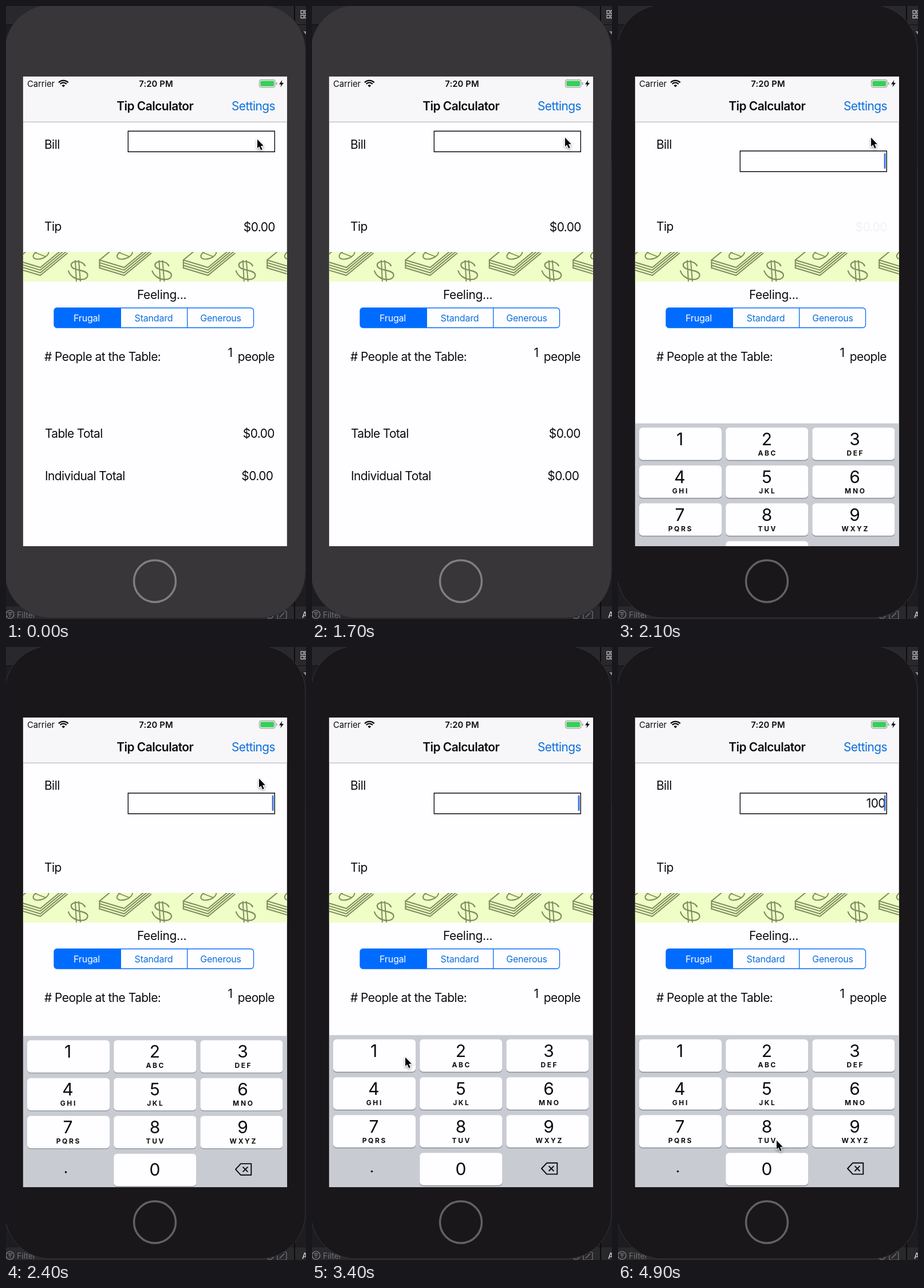
An HTML page with a canvas for the animation above (5000 ms loop, 524 px wide and 1069 px high).

```html
<!DOCTYPE html>
<html lang="en">
<head>
<meta charset="utf-8">
<title>Tip Calculator</title>
<style>
  html, body { margin: 0; width: 100%; height: 100%; overflow: hidden; background: #1d1c1f; }
  canvas { display: block; }
</style>
</head>
<body>
<canvas id="stage" width="524" height="1069"></canvas>
<script>
const ctx = document.getElementById('stage').getContext('2d');
const LOOP = 5000, STEP = 100;
const FOCUS = 1800, SLIDE = 1850;
const INK = '#0b0b0c', LINK = '#0a6fdf', BLUE = '#006cff', OLIVE = '#7f8c5e';
const SCREEN = { x: 29.7, y: 123, w: 461.2, h: 819 };

// Pointer stops: time, x, y
const PATH = [
  [0, 438, 231], [500, 438, 231], [1300, 441, 228], [2600, 441, 228],
  [3300, 162, 714], [3700, 162, 714], [4200, 237, 920], [4600, 237, 920], [4900, 276, 859]
];
// Typed value from each moment on
const TYPED = [[FOCUS, ''], [3600, '1'], [4400, '10'], [4700, '100']];

const clamp = v => Math.min(1, Math.max(0, v));
const inOut = p => p < 0.5 ? 2 * p * p : 1 - 2 * (1 - p) ** 2;
const spring = s => s <= 0 ? 0 : 1 - (1 + 14.5 * s) * Math.exp(-14.5 * s);

function text(str, x, y, o = {}) {
  ctx.font = `${o.weight || 400} ${o.size || 20.9}px Inter, sans-serif`;
  ctx.letterSpacing = (o.gap ?? -0.55) + 'px';
  ctx.textAlign = o.align || 'left';
  ctx.fillStyle = o.color || INK;
  ctx.fillText(str, x, y);
}

function rect(x, y, w, h, color) {
  ctx.fillStyle = color;
  ctx.fillRect(x, y, w, h);
}

function round(x, y, w, h, r) {
  ctx.beginPath();
  ctx.roundRect(x, y, w, h, r);
}

function fill(color) { ctx.fillStyle = color; ctx.fill(); }

function stroke(color, width) {
  ctx.strokeStyle = color;
  ctx.lineWidth = width;
  ctx.stroke();
}

function poly(points, close) {
  ctx.beginPath();
  points.forEach(([x, y]) => ctx.lineTo(x, y));
  if (close) ctx.closePath();
}

function line(x1, y1, x2, y2, color, width) {
  poly([[x1, y1], [x2, y2]]);
  stroke(color, width);
}

function circle(x, y, r) {
  ctx.beginPath();
  ctx.arc(x, y, r, 0, Math.PI * 2);
}

function drawDesk() {
  rect(0, 0, 524, 1069, '#1d1c1f');
  rect(0, 0, 524, 32, '#29282b');
  line(0, 32.5, 524, 32.5, '#111013', 1);
  rect(504, 33, 20, 10, '#29282b');
  rect(521, 198, 3, 74, '#08080a');
  for (const [x, y] of [[515, 8], [522, 8], [515, 16], [522, 16]]) {
    ctx.beginPath();
    ctx.rect(x, y, 5, 5);
    stroke('#b4b3b5', 1.3);
  }
  poly([[519, 44], [524, 44], [524, 50]], true);
  fill('#8b8a8d');

  rect(0, 1047, 524, 22, '#29282b');
  circle(7, 1061, 7);
  stroke('#8b8a8d', 1.2);
  [3.5, 2.5, 1.2].forEach((half, i) =>
    line(7 - half, 1058 + i * 3, 7 + half, 1058 + i * 3, '#8b8a8d', 1.2));
  text('Filter', 19, 1067, { size: 14, gap: 0, color: '#737276' });
  circle(461, 1062, 6);
  stroke('#77767a', 1.2);
  round(474, 1055, 16, 14, 2);
  stroke('#77767a', 1.2);
  line(478, 1066, 486, 1058, '#77767a', 1.2);
  rect(503, 0, 2, 1069, '#0c0b0e');
  text('A', 517, 1067, { size: 14, weight: 500, gap: 0, color: '#d0cfd1' });
}

function drawPhone(active) {
  round(-2, -2, 525, 1069, 80);
  fill(active ? '#19171a' : '#383638');
  stroke(active ? '#363538' : '#2c2a2d', 1);
  circle(260, 1003, 36.5);
  stroke(active ? '#626164' : '#7f7e80', 3.5);
}

function drawStatus() {
  text('Carrier', 37, 141, { size: 14.8, gap: -0.05 });
  text('7:20 PM', 262, 141, { size: 14.8, weight: 600, gap: 0.1, align: 'center' });

  for (const r of [4, 7.8, 11.6]) {
    ctx.beginPath();
    if (r === 4) ctx.moveTo(100.3, 141.5);
    ctx.arc(100.3, 141.5, r, -Math.PI * 0.755, -Math.PI * 0.245);
    if (r === 4) fill(INK); else stroke(INK, 2.3);
  }

  round(442.5, 128.6, 27.5, 13.2, 3.5);
  stroke('#a09fa2', 1.2);
  round(444.3, 130.4, 24, 9.6, 2);
  fill('#36cf58');
  round(471.7, 133, 1.8, 4.4, 1);
  fill('#a09fa2');
  poly([[482.5, 129], [477, 136.4], [480.6, 136.4], [479.3, 141.6], [485, 134], [481.4, 134]], true);
  fill(INK);
}

function drawNav() {
  rect(SCREEN.x, 123, SCREEN.w, 79, '#f7f6f8');
  rect(SCREEN.x, 201.6, SCREEN.w, 1.2, '#b9b8bb');
  drawStatus();
  text('Tip Calculator', 260.3, 182, { weight: 600, gap: -0.5, align: 'center' });
  text('Settings', 470, 182, { color: LINK, align: 'right' });
}

function drawStack() {
  for (let d = 0; d < 15; d += 4.6) {
    poly([[17, 443 + d], [60, 456 + d], [107, 417.5 + d]]);
    stroke(OLIVE, 2);
  }
  line(17, 443, 17, 457, OLIVE, 2);
  line(17, 443, 37, 426.5, OLIVE, 2);
  ctx.beginPath();
  ctx.ellipse(61, 433, 14, 7.5, -0.35, 0, Math.PI * 2);
  stroke(OLIVE, 2);
  line(51, 430, 69, 437, OLIVE, 1.8);
}

function drawDollar() {
  ctx.beginPath();
  ctx.moveTo(138, 453);
  ctx.bezierCurveTo(134, 443, 112, 443, 114, 453);
  ctx.bezierCurveTo(116, 462, 138, 459, 142, 467);
  ctx.bezierCurveTo(147, 480, 116, 482, 109, 462);
  stroke(OLIVE, 2.2);
  line(121, 444, 123, 481, OLIVE, 2);
  line(127, 444, 130, 481, OLIVE, 2);
}

function drawBand() {
  ctx.save();
  ctx.beginPath();
  ctx.rect(SCREEN.x, 429, SCREEN.w, 51.5);
  ctx.clip();
  rect(29, 429, 463, 52, '#effdc6');
  ctx.lineJoin = ctx.lineCap = 'round';
  for (let i = 0; i < 4; i++) {
    ctx.save();
    ctx.translate(i * 146.4, 0);
    drawStack();
    drawDollar();
    ctx.restore();
  }
  ctx.restore();
}

function drawSegments() {
  round(84, 526.5, 116.5, 34.5, [5, 0, 0, 5]);
  fill(BLUE);
  round(84, 526.5, 348.5, 34.5, 5);
  stroke(BLUE, 1.3);
  line(200.3, 526, 200.3, 561, BLUE, 1.3);
  line(316.7, 526, 316.7, 561, BLUE, 1.3);
  ['Frugal', 'Standard', 'Generous'].forEach((name, i) =>
    text(name, 141 + i * 117, 549.5,
      { size: 16, gap: -0.2, align: 'center', color: i ? LINK : '#fff' }));
}

function drawField(t, moved) {
  const y = 218.2 + 36.6 * moved;
  ctx.beginPath();
  ctx.rect(213.3, y, 256, 36);
  stroke(INK, 1.4);
  if (t < FOCUS) return;
  const [since, value] = TYPED.filter(([at]) => at <= t).pop();
  text(value, 467, y + 24.7, { align: 'right' });
  const age = t - since - (value ? 0 : 100);
  if (age >= 0 && age % 1000 <= 600) {
    round(464.6, y + 4, 2.9, 27, 1);
    fill('#3f77d8');
  }
}

function drawForm(t) {
  const moved = inOut(clamp((t - SLIDE) / 300));
  text('Bill', 67, 249);
  text('Tip', 67, 392);
  drawField(t, moved);
  drawBand();
  text('Feeling...', 272, 511, { align: 'center', gap: -0.3 });
  drawSegments();
  text('# People at the Table:', 67, 619, { gap: -0.5 });
  text('1', 395.5, 612, { align: 'right' });
  text('people', 469, 619, { align: 'right' });

  ctx.globalAlpha = 1 - moved;
  text('$0.00', 470, 392.5, { align: 'right' });
  text('Table Total', 68, 753, { gap: -0.65 });
  text('$0.00', 469, 753, { align: 'right' });
  text('Individual Total', 68, 827);
  text('$0.00', 466.5, 827, { align: 'right' });
  ctx.globalAlpha = 1;
}

function drawKey(i, letters) {
  const col = i % 3, row = Math.floor(i / 3);
  const x = 37 + col * 151.2, y = 7.5 + row * 66;
  const mid = [108, 260, 413.5][col];
  round(x, y + 1.4, 144, 56.5, 6);
  fill('#8b8d91');
  round(x, y, 144, 56.5, 6);
  fill('#fefdff');
  const digit = row === 3 ? '0' : String(i + 1);
  text(digit, mid, y + (row === 3 ? 38.5 : 30.5), { size: 30, gap: 0, align: 'center' });
  text(letters, mid + 1.3, y + 48.3, { size: 12, weight: 700, gap: 2.6, align: 'center' });
}

function drawKeyboard(t) {
  const up = spring((t - SLIDE - 40) / 1000);
  if (!up) return;
  ctx.save();
  ctx.translate(0, 942 - 265.2 * up);
  rect(SCREEN.x, 0, SCREEN.w, 270, '#c8ccd2');
  ['', 'ABC', 'DEF', 'GHI', 'JKL', 'MNO', 'PQRS', 'TUV', 'WXYZ']
    .forEach((letters, i) => drawKey(i, letters));
  drawKey(10, '');
  circle(104.5, 237.7, 1.8);
  fill(INK);
  ctx.lineJoin = 'round';
  poly([[401, 232.7], [410, 223], [428.3, 223], [428.3, 242.6], [410, 242.6]], true);
  stroke(INK, 1.9);
  line(413.6, 228.4, 422.4, 237.2, INK, 1.9);
  line(422.4, 228.4, 413.6, 237.2, INK, 1.9);
  ctx.restore();
}

function drawPointer(t) {
  const next = PATH.findIndex(([at]) => at > t);
  const b = next < 0 ? PATH[PATH.length - 1] : PATH[next];
  const a = next < 0 ? b : PATH[next - 1];
  const p = a === b ? 0 : inOut((t - a[0]) / (b[0] - a[0]));
  ctx.save();
  ctx.translate(a[1] + (b[1] - a[1]) * p, a[2] + (b[2] - a[2]) * p);
  ctx.lineJoin = 'round';
  poly([[1, 1.5], [1, 17], [4.4, 13.9], [7.2, 20.2], [9.7, 19], [7, 12.9], [11.8, 12.7]], true);
  ctx.shadowColor = 'rgba(0,0,0,.4)';
  ctx.shadowBlur = 4;
  ctx.shadowOffsetY = 2;
  stroke('#fff', 2);
  ctx.shadowColor = 'transparent';
  fill('#050505');
  ctx.restore();
}

function draw(t) {
  drawDesk();
  drawPhone(t >= FOCUS);
  ctx.save();
  ctx.beginPath();
  ctx.rect(SCREEN.x, SCREEN.y, SCREEN.w, SCREEN.h);
  ctx.clip();
  rect(SCREEN.x, SCREEN.y, SCREEN.w, SCREEN.h, '#fefdff');
  drawNav();
  drawForm(t);
  drawKeyboard(t);
  ctx.restore();
  drawPointer(t);
}

const start = performance.now();
function tick() {
  const t = (performance.now() - start) % LOOP;
  draw(Math.floor(t / STEP) * STEP);
  requestAnimationFrame(tick);
}
tick();
</script>
</body>
</html>
```
